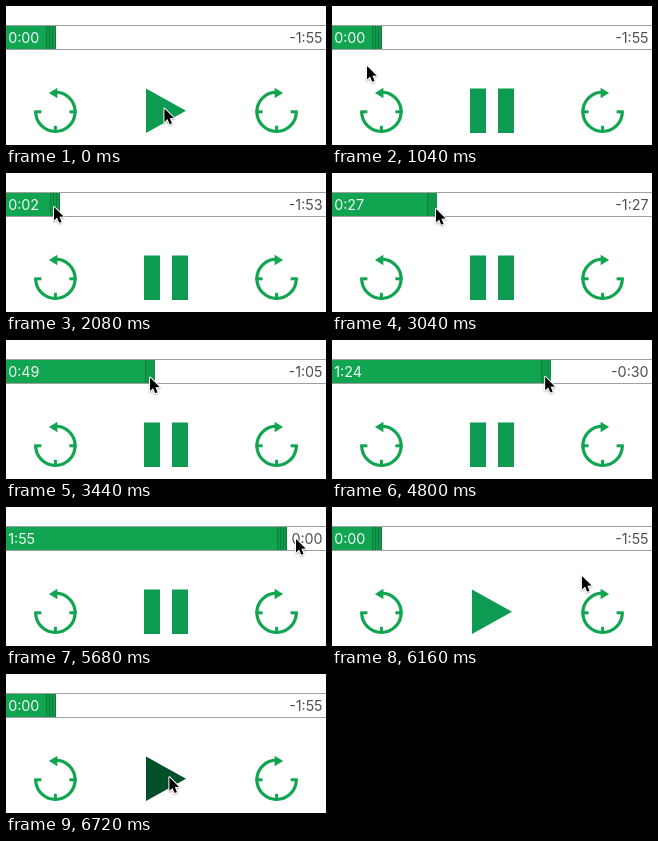
Animation of 320 by 139 pixels, one loop 6800 ms. Source, as an HTML page with a canvas:

```html
<!DOCTYPE html>
<html lang="en">
<head>
<meta charset="utf-8">
<title>Audio player</title>
<style>
html, body { margin: 0; width: 100%; height: 100%; overflow: hidden; background: #fff; }
canvas { display: block; }
</style>
</head>
<body>
<canvas id="stage"></canvas>
<script>
const canvas = document.getElementById('stage');
const ctx = canvas.getContext('2d');
const ratio = window.devicePixelRatio || 1;
canvas.width = 320 * ratio;
canvas.height = 139 * ratio;
canvas.style.width = '320px';
canvas.style.height = '139px';
ctx.scale(ratio, ratio);

const LOOP = 6800, STEP = 80, DURATION = 115;
const PLAY = 400, DRAG = 2960, RELEASE = 6000;
const HANDLE = 10, BAR_START = 50, BAR_END = 281;
const GRIP = 7, LAG = 15;
const GREEN = '#12a551', ICON = '#0c9b51', PRESSED = '#005029';

// Each move starts where the previous one stopped.
const start = { x: 158.4, y: 102.5 };
const moves = [
  { from: 640, to: 1040, x: 35, y: 60 },
  { from: 1040, to: 1600, x: 48, y: 34 },
  { from: 2880, to: 3040, x: 104, y: 36 },
  { from: 3040, to: 3760, x: 185, y: 39 },
  { from: 4320, to: 5120, x: 237, y: 35 },
  { from: 5360, to: 5680, x: 290, y: 32 },
  { from: 5920, to: 6400, x: 198, y: 117 },
  { from: 6400, to: 6640, x: 163.4, y: 103.3 }
];

const clamp = (v, low, high) => Math.min(high, Math.max(low, v));

function cursorAt(t) {
  let { x, y } = start;
  for (const move of moves) {
    const p = clamp((t - move.from) / (move.to - move.from), 0, 1) ** 1.2;
    x += (move.x - x) * p;
    y += (move.y - y) * p;
  }
  return { x, y };
}

// Playback ticks on whole seconds; scrubbing follows the cursor.
function secondsAt(t) {
  if (t < PLAY || t >= RELEASE) return 0;
  if (t < DRAG) return Math.max(0, Math.floor((t - 640) / 720));
  const end = cursorAt(t - LAG).x + GRIP;
  return clamp((end - BAR_START) / (BAR_END - BAR_START), 0, 1) * DURATION;
}

function clock(s) {
  const n = Math.floor(s);
  return Math.floor(n / 60) + ':' + String(n % 60).padStart(2, '0');
}

function rect(color, x, y, w, h) {
  ctx.fillStyle = color;
  ctx.fillRect(x, y, w, h);
}

function polygon(...points) {
  ctx.beginPath();
  points.forEach(([x, y]) => ctx.lineTo(x, y));
  ctx.closePath();
}

function label(text, x, align, color) {
  ctx.font = '14.3px Inter, Roboto, sans-serif';
  ctx.textAlign = align;
  ctx.fillStyle = color;
  ctx.fillText(text, x, 37);
}

function drawBar(seconds, dragging) {
  const end = Math.round(BAR_START + (BAR_END - BAR_START) * seconds / DURATION);
  const left = end - HANDLE;
  const smooth = dragging && end < BAR_END;
  rect('#a0a0a0', 0, 19, 320, 1);
  rect('#a0a0a0', 0, 43, 320, 1);
  rect(GREEN, 0, 20, end, 23);
  rect('#10994b', left, 20, HANDLE, 23);
  for (let dx = 0; dx < (smooth ? 1 : HANDLE); dx += 3) {
    rect('#0a7f3d', left + dx, 20, 1, 23);
  }
  const rest = DURATION - seconds;
  label(clock(seconds), 2.2, 'left', '#effaf3');
  label((rest > 0 ? '-' : '') + clock(rest), 316.6, 'right', '#505050');
}

function drawSkip(x, direction) {
  ctx.save();
  ctx.translate(x, 105.8);
  ctx.scale(direction, 1);
  ctx.strokeStyle = ctx.fillStyle = GREEN;
  ctx.lineWidth = 3.2;
  ctx.beginPath();
  ctx.arc(0, 0, 19.7, -Math.PI / 2, Math.PI);
  ctx.stroke();
  for (let tick = 0; tick < 3; tick++) {
    ctx.fillRect(14, -1.5, 7.2, 3);
    ctx.rotate(Math.PI / 2);
  }
  ctx.rotate(Math.PI / 2);
  polygon([-6.5, -18.8], [2, -24], [2, -13.6]);
  ctx.fill();
  ctx.restore();
}

function drawPlayPause(stopped, pressed) {
  if (stopped) {
    polygon([140, 82.6], [180, 104.8], [140, 127]);
    ctx.fillStyle = pressed ? PRESSED : ICON;
    ctx.fill();
  } else {
    for (const x of [138, 166]) rect(ICON, x, 82.5, 16, 44.5);
  }
}

function drawCursor({ x, y }) {
  ctx.save();
  ctx.translate(x, y);
  polygon([0, 0], [0, 13.5], [3.1, 10.6], [5.2, 15.7], [7.5, 14.7], [5.4, 9.8], [9.6, 9.6]);
  ctx.lineJoin = 'round';
  ctx.lineWidth = 2;
  ctx.strokeStyle = '#fff';
  ctx.shadowColor = 'rgba(0,0,0,.3)';
  ctx.shadowBlur = 2 * ratio;
  ctx.shadowOffsetY = ratio;
  ctx.stroke();
  ctx.shadowColor = 'transparent';
  ctx.fillStyle = '#000';
  ctx.fill();
  ctx.restore();
}

function frame() {
  const t = Math.floor(performance.now() % LOOP / STEP) * STEP;
  const stopped = t < PLAY || t >= RELEASE;
  const pressed = t >= LOOP - STEP || t === PLAY - STEP;
  rect('#fff', 0, 0, 320, 139);
  drawBar(secondsAt(t), t >= DRAG && t < RELEASE);
  drawSkip(49.4, 1);
  drawSkip(270.6, -1);
  drawPlayPause(stopped, pressed);
  drawCursor(cursorAt(t));
  requestAnimationFrame(frame);
}
frame();
</script>
</body>
</html>
```
